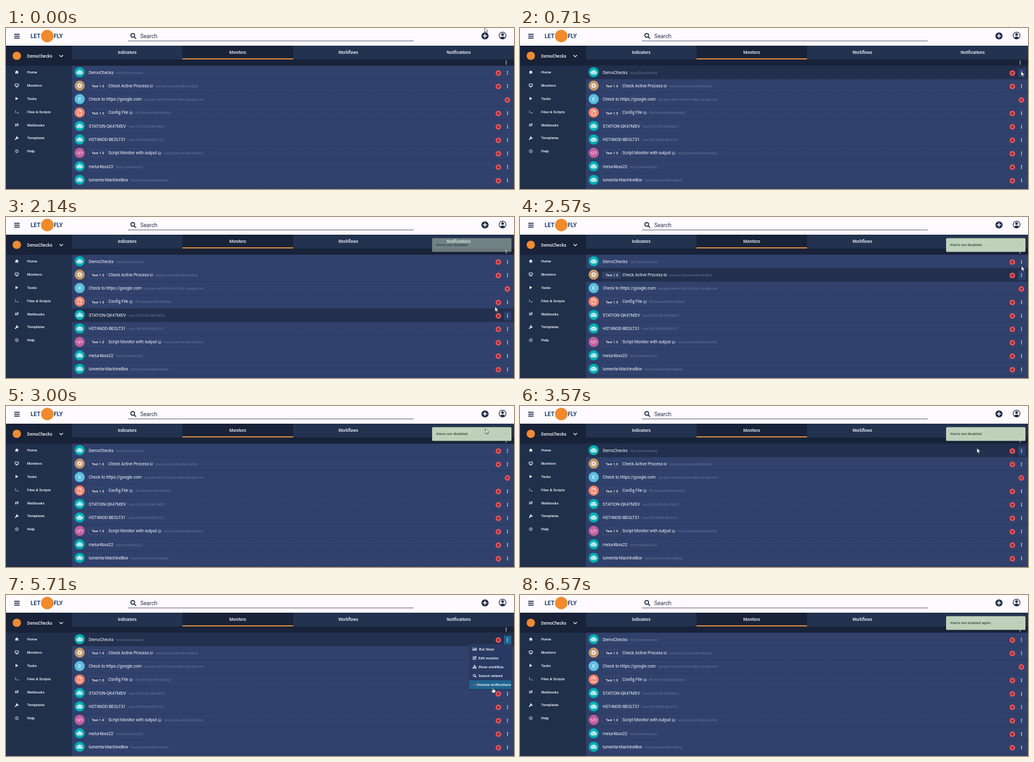
Recreate the animation shown at these times as an HTML page. Size 800 px wide and 255 px high, loop 7440 ms.

```html
<!DOCTYPE html>
<html lang="en">
<head>
<meta charset="utf-8">
<title>Monitors</title>
<style>
html, body { margin: 0; width: 100%; height: 100%; overflow: hidden; background: #30416c; }
svg { display: block; width: 100vw; height: 100vh; font-family: Roboto, sans-serif; }
text { white-space: pre; }
</style>
</head>
<body>
<svg id="stage" viewBox="0 0 800 255" preserveAspectRatio="none"></svg>
<script>
const LOOP = 7440, STEP = 1000 / 7, LAST = 46;
const ROW0 = 59.7, PITCH = 21.3;
const NAVY = '#1d2a48', WHITE = '#f4f6fb';

const rect = (x, y, w, h, fill, more = '') =>
  `<rect x="${x}" y="${y}" width="${w}" height="${h}" fill="${fill}" ${more}/>`;
const circle = (x, y, r, fill, more = '') =>
  `<circle cx="${x}" cy="${y}" r="${r}" fill="${fill}" ${more}/>`;
const label = (x, y, size, fill, s, more = '') =>
  `<text x="${x}" y="${y}" font-size="${size}" fill="${fill}" ${more}>${s}</text>`;
const path = (d, fill, more = '') => `<path d="${d}" fill="${fill}" ${more}/>`;
const line = (d, stroke, w, more = '') =>
  path(d, 'none', `stroke="${stroke}" stroke-width="${w}" ${more}`);
const at = (x, y, s, id = '') => `<g ${id && `id="${id}"`} transform="translate(${x} ${y})">${s}</g>`;
const kebab = (x, y) => [-2.2, 0, 2.2].map(d => circle(x, y + d, 0.8, WHITE)).join('');
const bold = 'font-weight="500"';

// Icons are drawn around their own centre.
const icon = {
  home: path('M-3 0L0-2.7 3 0H2.1V2.5H.6V.8H-.6V2.5H-2.1V0Z', WHITE),
  screen: line('M-2.7-2.2H2.7V1.2H-2.7ZM-1.4 2.6H1.4M0 1.2V2.6', WHITE, 0.9),
  play: path('M-2-2.5L2.4 0-2 2.5Z', WHITE),
  prompt: line('M-2.8-1.8L-1 0-2.8 1.8M0 2H2.8', WHITE, 0.8),
  swap: line('M-2.7-1.1H2.4M-2.4 1.2H2.7M1-2.4L2.5-1.1 1 0M-1 0L-2.5 1.2-1 2.4', WHITE, 0.9),
  wrench: line('M-2.2 2.3L.8-.7', WHITE, 1.5, 'stroke-linecap="round"') +
    line('M.7-2.4A1.6 1.6 0 1 0 2.5-.6', WHITE, 1.1),
  help: circle(0, 0, 2.4, 'none', `stroke="${WHITE}" stroke-width=".7"`) +
    label(0, 1.5, 4, WHITE, '?', 'text-anchor="middle" font-weight="700"'),
  bot: rect(-3.6, -2.6, 7.2, 6, WHITE, 'rx="1.2"') + rect(-0.5, -4.3, 1, 2, WHITE) +
    rect(-5, -0.6, 0.9, 2.8, WHITE) + rect(4.1, -0.6, 0.9, 2.8, WHITE) +
    circle(-1.6, -0.3, 0.8, '#00aeb4') + circle(1.6, -0.3, 0.8, '#00aeb4') +
    rect(-1.9, 1.7, 3.8, 0.7, '#00aeb4'),
  gear: circle(0, 0, 2.3, 'none', `stroke="${WHITE}" stroke-width="1.5"`) +
    circle(0, 0, 3.4, 'none', `stroke="${WHITE}" stroke-width="1.1" stroke-dasharray="1.4 1.27"`),
  letter: label(0, 2.7, 7.5, WHITE, 'C', 'text-anchor="middle" font-weight="700"'),
  file: line('M-2.7-3.9H.8L2.9-1.8V3.9H-2.7ZM.6-3.9V-1.6H2.9', WHITE, 0.9),
  code: line('M-2.2-2.1L-4.3 0-2.2 2.1M2.2-2.1L4.3 0 2.2 2.1M.8-2.9L-.8 2.9', WHITE, 0.9),
  chart: line('M-3-2.5V2.3H3.2', WHITE, 0.8) +
    line('M-1.5 1.6V0M0 1.6V-1.8M1.4 1.6V-.8M2.7 1.6V-2.3', WHITE, 0.9),
  edit: line('M.6-1.7H-2.5V2.4H1.9V.6', WHITE, 0.8) + line('M-.7.8L2.6-2.4', WHITE, 1.4),
  tree: rect(-1, -2.7, 2, 1.8, WHITE) + line('M0-1V1M-2.2 1V0H2.2V1', WHITE, 0.6) +
    [-3.1, -0.9, 1.3].map(x => rect(x, 0.8, 1.8, 1.7, WHITE)).join(''),
  search: circle(-0.5, -0.5, 1.8, 'none', `stroke="${WHITE}" stroke-width="1"`) +
    line('M.8.8L2.5 2.5', WHITE, 1.2),
  sound: path('M-3-.9H-1.7L0-2.4V2.4L-1.7.9H-3Z', WHITE) +
    line('M.9-1.1Q1.7 0 .9 1.1M1.8-2Q3.3 0 1.8 2', WHITE, 0.7),
  silent: path('M-1.7-.8H-.7L1-2.3V2.3L-.7.8H-1.7Z', '#d8404f')
};

const side = [['home', 'Home'], ['screen', 'Monitors'], ['play', 'Tasks'],
  ['prompt', 'Files &amp; Scripts'], ['swap', 'Webhooks'], ['wrench', 'Templates'], ['help', 'Help']];

const TEAL = '#00aeb4', HOST = 'lumenta-MachineBox';
const rows = [
  { name: 'DemoChecks', kind: 'host (DemoChecks)' },
  { name: 'Check Active Process', kind: `process (${HOST})`, icon: 'gear', fill: '#c4986a', info: 229 },
  { name: 'Check to https://google.com', kind: 'groupby-name-Check to https://google.com',
    icon: 'letter', fill: '#5ac0e2', plain: true },
  { name: 'Config File', kind: `file (${HOST})`, icon: 'file', fill: '#f5836a', info: 197 },
  { name: 'STATION-QK47MDV', kind: 'host (STATION-QK47MDV)' },
  { name: 'HST4NOD-BEOLT31', kind: 'host (HST4NOD-BEOLT31)' },
  { name: 'Script Monitor with output', kind: `script (${HOST})`, icon: 'code', fill: '#c05f9b', info: 242 },
  { name: 'melur4box22', kind: 'host (melur4box22)' },
  { name: HOST, kind: `host (${HOST})` }
];

const menu = [['chart', 'Bot Stats', 745], ['edit', 'Edit monitor', 744],
  ['tree', 'Show workflow', 744], ['search', 'Search related', 744]];

function header() {
  return rect(0, 0, 800, 28, '#fefafd') +
    line('M13 10H21.5M13 13H21.5M13 16H21.5', NAVY, 1.4) +
    label(38.7, 16.3, 9, '#20406c', 'LET', 'font-weight="700"') +
    circle(65, 12.8, 10, '#f08a2c') +
    label(75.2, 16.3, 9, '#20406c', 'FLY', 'font-weight="700"') +
    circle(199.6, 11.8, 3, 'none', `stroke="${NAVY}" stroke-width="1.4"`) +
    line('M201.8 14L204.8 17', NAVY, 1.6) +
    label(211.5, 16, 8.75, '#2a3148', 'Search') +
    rect(192, 20, 450, 1, '#6c7188') +
    circle(754.3, 12.5, 5.6, NAVY) + line('M751 12.5H757.6M754.3 9.2V15.8', '#fff', 1.5) +
    circle(782, 12, 5.4, 'none', `stroke="${NAVY}" stroke-width="1.1"`) +
    circle(782, 10.4, 2.1, NAVY) + path('M778 15.6Q782 11.5 786 15.6Q782 19 778 15.6Z', NAVY);
}

function sidebar() {
  return rect(0, 28, 104, 227, '#20304a') + rect(0, 28, 104, 31.7, '#182238') +
    circle(17, 44, 6.6, '#ee8b33') +
    label(33.3, 46.6, 6.67, WHITE, 'DemoChecks', bold) +
    line('M84.2 42.8L87 45.6 89.8 42.8', WHITE, 1.1) +
    side.map(([id, s], i) => {
      const y = 70 + i * 20.85;
      return at(17, y, icon[id]) + label(33.3, y + 2.1, 5.83, WHITE, s, bold);
    }).join('');
}

function tabs() {
  return rect(104, 28, 696, 22, '#23324f') + rect(278, 28, 174, 22, '#182238') +
    rect(104, 50, 696, 9.7, '#182238') + rect(278, 48, 174, 1.7, '#ee9440') +
    ['Indicators', 'Monitors', 'Workflows', 'Notifications'].map((s, i) =>
      label(191 + i * 174, 41.3, 6.6, WHITE, s, 'text-anchor="middle" ' + bold)).join('') +
    kebab(787.6, 54.8);
}

function row(r, i) {
  const y = 70.2 + i * PITCH, x = r.info ? 161.3 : 130.3;
  const sub = (x, s) => label(x, y + 2, 4.95, '#687799', `<tspan>• </tspan>${s}`, 'font-style="italic"');
  let s = line(`M104 ${ROW0 + (i + 1) * PITCH}H800`, '#263658', 0.8, 'stroke-dasharray="1.2 .6"') +
    circle(116, y - 0.2, 8, r.fill || TEAL) + at(116, y - 0.2, icon[r.icon || 'bot']);
  if (r.info) {
    s += rect(130.5, y - 4.4, 28, 9.6, '#2c3c65', 'rx="1.2" stroke="#4b5d87" stroke-width=".6"') +
      label(134.7, y + 2.4, 5.5, WHITE, 'Test 1.0', bold) +
      label(x, y + 2.3, 6.6, WHITE, r.name) +
      circle(r.info - 0.2, y + 0.2, 2.8, '#7585a8') +
      label(r.info - 0.2, y + 1.9, 4.5, '#2c3c64', '?', 'text-anchor="middle" font-weight="700"') +
      sub(r.info + 4.3, r.kind);
  } else {
    s += label(x, y + 2.3, 6.6, WHITE,
      `${r.name}<tspan font-size="4.95" font-style="italic" fill="#687799" dx="2">• ${r.kind}</tspan>`);
  }
  const bx = r.plain ? 789.6 : 775.4, by = y + 1.2;
  s += circle(bx, by, 4.4, '#ee4f51') +
    line(`M${bx - 1.5} ${by - 1.5}l3 3m0-3l-3 3`, '#30324f', 1.1);
  return s + (r.plain ? '' : kebab(789.7, y + 0.8));
}

function dropdown() {
  return rect(729.5, 78.5, 67, 72, '#141d33', 'rx="1.5" opacity=".35"') +
    rect(729, 78, 67, 72, '#283a64', 'rx="1.2"') +
    rect(729.5, 0, 66.3, 13.8, '#1f6490', 'id="pick" rx="1"') +
    menu.map(([id, s, x], i) => {
      const y = 85.4 + i * 14.2;
      return at(738, y, icon[id]) + label(x, y + 2.1, 5.83, WHITE, s, bold);
    }).join('') +
    `<g id="mute">${at(738, 142.2, icon.sound)}${label(743.3, 144.3, 5.83, WHITE, 'Mute notifications', bold)}</g>` +
    `<g id="unmute">${at(737, 142.2, icon.silent)}${label(741, 144.3, 5.83, WHITE, 'Unmute notifications', bold)}</g>`;
}

const arrow = path('M0 0V8L1.9 6.3 3.1 9 4.4 8.4 3.2 5.8H5.7Z', '#fff', 'stroke="#1a1a22" stroke-width=".6"');
const hand = path('M-.8.6Q0-.5.8.6V3.2L3.5 3.9Q4.3 4.2 4.1 5L3.4 8.5H-.9L-3 5.4Q-2.6 4.2-.8 5.3Z',
  '#fff', 'stroke="#1a1a22" stroke-width=".6"');

document.getElementById('stage').innerHTML =
  rect(104, 59, 696, 196, '#30416c') +
  rect(104, 0, 696, PITCH, '#23304d', 'id="hover"') +
  rect(784.3, 0, 11.6, 14, '#2c406c', 'id="button" rx="1"') +
  rows.map(row).join('') + sidebar() + tabs() + header() +
  `<g id="menu">${dropdown()}</g>` +
  `<g id="toast">${rect(671, 33.5, 125, 21.8, '#c6d8c0', 'rx="1.5" opacity=".96"')}` +
  label(677.3, 46.2, 5.83, '#49634c', '', 'id="note" font-weight="700"') +
  line('M785.9 42.3l2.6 2.6m0-2.6l-2.6 2.6', '#9bb39a', 0.7) + '</g>' +
  at(0, 0, `<g id="arrow">${arrow}</g><g id="hand">${hand}</g>`, 'cursor');

const el = {};
document.querySelectorAll('[id]').forEach(n => el[n.id] = n);
const show = (n, on) => n.setAttribute('display', on ? 'inline' : 'none');
const set = (n, a) => { for (const k in a) n.setAttribute(k, a[k]); };

// Pointer path: step, x, y.
const route = [[0, 753.5, -1], [2, 774, 30], [4, 789, 68], [7, 789, 69], [9, 782, 96],
  [11, 764, 138], [12, 762, 143], [14, 763, 146], [15, 770, 142], [16, 780, 120], [18, 789.5, 77.5],
  [20, 774, 43], [21, 755, 36], [23, 729, 52], [25, 719.5, 66.5], [27, 738, 67], [30, 792, 68],
  [32, 795.5, 69], [34, 793, 76], [36, 785, 104], [38, 771, 144], [39, 768, 150], [40, 767, 146.5],
  [42, 767, 147], [44, 781, 167], [46, 805, 176]];

function pointer(k) {
  const i = Math.max(1, route.findIndex(p => p[0] >= k));
  const [a, x, y] = route[i - 1], [b, u, v] = route[i], f = (k - a) / (b - a);
  return [x + (u - x) * f, y + (v - y) * f];
}

const within = (k, a, b) => k >= a && k < b;

function draw(ms) {
  const k = Math.min(LAST, Math.floor((ms % LOOP + 5) / STEP));
  const [x, y] = pointer(k);
  const first = within(k, 6, 14), second = within(k, 31, 43), open = first || second;
  const gone = k === LAST;

  // The hover follows the pointer's body.
  const r = open ? 0 : Math.floor((y + 5 - ROW0) / PITCH);
  const hovered = !gone && r >= 0 && r < rows.length;
  show(el.hover, hovered);
  show(el.button, hovered && !rows[r].plain);
  if (hovered) {
    set(el.hover, { y: ROW0 + r * PITCH });
    set(el.button, { y: 64.2 + r * PITCH, fill: open ? '#1f6490' : '#2c406c' });
  }

  show(el.menu, open);
  show(el.mute, first);
  show(el.unmute, second);
  const item = Math.min(4, Math.floor((y - 78) / 14.2));
  show(el.pick, open && item >= 0);
  set(el.pick, { y: 78.3 + item * 14.2,
    stroke: first && k >= 12 ? '#b7cee0' : 'none', 'stroke-width': 0.8 });

  const fade = within(k, 16, 35) || k >= 45 ? 1 : k === 15 || k === 35 || k === 44 ? 0.5 : 0;
  set(el.toast, { opacity: fade });
  el.note.textContent = k < 40 ? 'Alerts are disabled.' : 'Alerts are enabled again.';

  show(el.cursor, !gone);
  show(el.hand, open);
  show(el.arrow, !open);
  set(el.cursor, { transform: `translate(${x} ${y})` });
}

const start = performance.now();
function tick() {
  draw(performance.now() - start);
  requestAnimationFrame(tick);
}
tick();
</script>
</body>
</html>
```
